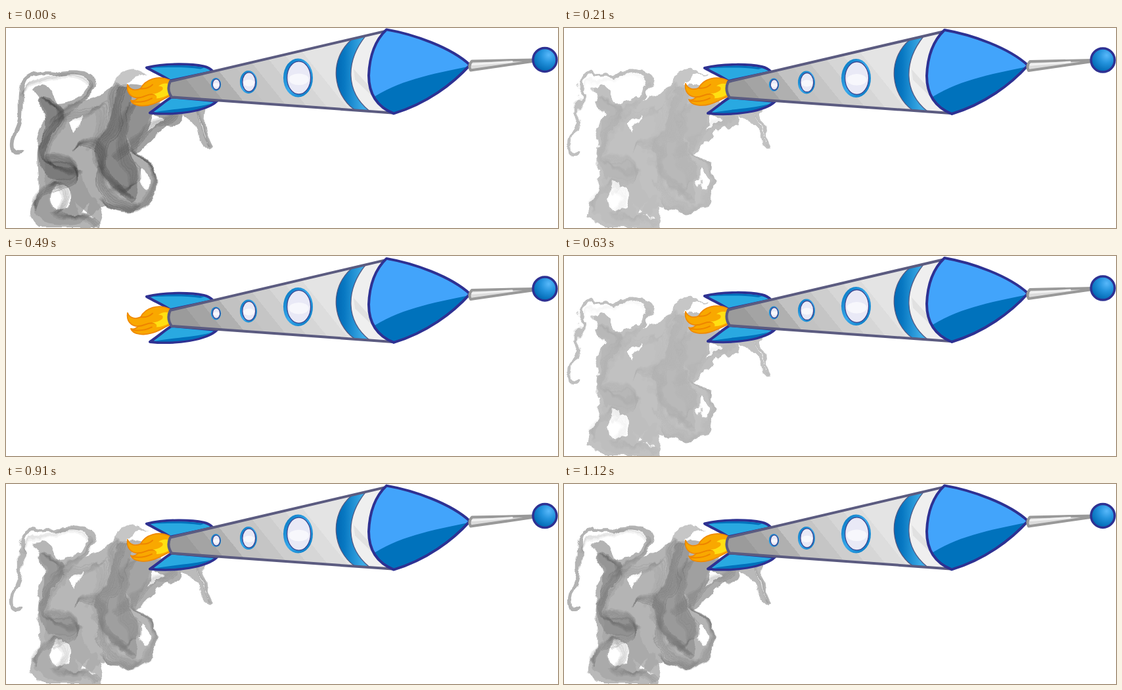
Write an HTML page that moves like this. It is 840 px wide and 305 px high and loops after 1190 ms.

```html
<!DOCTYPE html>
<html lang="en">
<head>
<meta charset="utf-8">
<title>Rocket</title>
<style>
html, body { margin: 0; width: 100%; height: 100%; overflow: hidden; background: #fff; }
svg { display: block; width: 840px; height: 305px; }
</style>
</head>
<body>
<svg viewBox="0 0 840 305" xmlns="http://www.w3.org/2000/svg">
  <defs>
    <linearGradient id="metal" gradientUnits="userSpaceOnUse" x1="270" y1="110" x2="434" y2="-22"></linearGradient>
    <linearGradient id="band" x1="0" y1="0" x2="1" y2="0">
      <stop offset="0" stop-color="#0069b4"/><stop offset="0.25" stop-color="#0878c2"/><stop offset="0.8" stop-color="#3cabe6"/>
    </linearGradient>
    <linearGradient id="ring" x1="0" y1="0" x2="1" y2="1">
      <stop offset="0" stop-color="#0071bc"/><stop offset="0.5" stop-color="#36a9ec"/><stop offset="1" stop-color="#0071bc"/>
    </linearGradient>
    <radialGradient id="ball" cx="0.66" cy="0.3" r="0.72">
      <stop offset="0" stop-color="#58b8fa"/><stop offset="0.45" stop-color="#2493dd"/><stop offset="1" stop-color="#0068b2"/>
    </radialGradient>
    <filter id="ragged" filterUnits="userSpaceOnUse" x="0" y="0" width="340" height="305" color-interpolation-filters="sRGB">
      <feTurbulence type="fractalNoise" baseFrequency="0.045 0.035" numOctaves="3" seed="8"/>
      <feDisplacementMap id="warp" in="SourceGraphic" scale="10" xChannelSelector="R" yChannelSelector="G"/>
    </filter>
    <clipPath id="noseClip"><use href="#noseShape"/></clipPath>
    <path id="noseShape" d="M579 2 C620 9 677 29 706 56 C680 85 640 115 590 130 C563 119 552 99 552 72 C553 45 560 20 579 2Z"/>
  </defs>

  <g id="smoke" filter="url(#ragged)">
    <g id="haze" fill="#c6c6c6" fill-rule="evenodd"></g>
    <g id="folds" fill="#4e4e4e" stroke="#444" fill-rule="evenodd"></g>
  </g>

  <g id="rocket" stroke-linejoin="round" stroke-linecap="round">
    <g stroke="#2e3192" stroke-width="4">
      <path fill="#29a9e1" d="M214 60 C245 53 282 54 301 58 Q310 60 315 66 L250 80 C238 72 228 68 214 60Z"/>
      <path fill="#29a9e1" d="M219 129 C231 121 242 111 252 105 L321 111 C306 126 258 133 219 129Z"/>
    </g>
    <path fill="#0071bc" d="M220 60 C250 55 280 56 302 60 L296 62 C270 58 242 60 220 60Z M226 128 C258 122 287 122 311 115 C293 127 256 130 226 128Z"/>

    <g id="flame">
      <path fill="#f9a800" stroke="#f08a00" stroke-width="1.8" d="M249 79 C232 71 212 78 205 92 C197 96 188 94 185 86 C183 98 190 106 201 106 Q196 112 190 110 C193 119 210 120 222 116 C233 113 240 107 250 103Z"/>
      <path fill="none" stroke="#ee8500" stroke-width="2" d="M205 92 Q216 93 223 86 M201 106 C211 106 215 99 226 101 M193 112 Q209 114 222 107"/>
      <path fill="#ffdf12" d="M249 85 Q240 82 232 88 Q241 88 238 94 Q231 100 222 100 Q231 101 229 107 Q240 106 249 100Z"/>
    </g>

    <path fill="url(#metal)" d="M250 81 L579 4 L588 129 L252 105 Q244 93 250 81Z"/>
    <path fill="#efefef" d="M547 12 L579 4 L588 129 L553 126 C516 96 517 50 547 12Z"/>
    <path fill="#e1e1e1" d="M529 62 L555 91 L562 108 L531 78Z"/>
    <path fill="url(#band)" stroke="#4f5a86" stroke-width="1.3" d="M526 17 L547 12 C517 50 516 96 553 126 L530 124 C498 101 490 48 526 17Z"/>
    <path fill="none" stroke="#5b5b80" stroke-width="4" d="M579 4 L250 81 Q244 93 252 105 L588 129"/>

    <g id="windows"></g>

    <g clip-path="url(#noseClip)">
      <use href="#noseShape" fill="#42a4fb"/>
      <path fill="#0072bc" d="M555 108 C595 80 650 69 710 57 L700 135 L580 140Z"/>
    </g>
    <use href="#noseShape" fill="none" stroke="#2e3192" stroke-width="4"/>

    <path fill="#dcdcdc" stroke="#999" stroke-width="4" d="M804 48 L709 50 Q703 57 707 64 L804 50"/>
    <path fill="none" stroke="#f2f2f2" stroke-width="3" d="M710 55 L770 51"/>
    <circle cx="820" cy="48" r="18" fill="url(#ball)" stroke="#2e3192" stroke-width="3.5"/>
  </g>
</svg>
<script>
const STEP = 70;
const haze = [1, 1, 1, 1, .4, 0, 0, 0, 0, 1, 1, 1, 1, 1, 1, 1, 1];
const folds = [1, .75, .48, .2, .1, 0, 0, 0, 0, .2, .5, .82, .72, .62, .55, .6, .7];
const drop = [.4, .5, .7, 1, 1.6, 2.3, 2.5, 1.9, 1.9, 1, .9, .8, .7, .6, .5, .4, .4];
const flicker = [0, .7, 1.4, 2, 1.2, 0, -.5, 1, 1, 2, 2.2, 2.4, 2, 1.6, 1.2, .8, .4];

const byId = id => document.getElementById(id);
function add(parent, tag, attributes) {
  const node = document.createElementNS('http://www.w3.org/2000/svg', tag);
  for (const key in attributes) node.setAttribute(key, attributes[key]);
  return parent.appendChild(node);
}

// Hard-edged diagonal shading of the hull
const greys = [155, 164, 176, 194, 197, 206, 214, 221, 228];
greys.forEach((grey, i) => {
  for (const edge of [i, i + 1]) {
    add(byId('metal'), 'stop', { offset: edge / greys.length, 'stop-color': `rgb(${grey},${grey},${grey})` });
  }
});

function porthole(cx, cy, rx, ry, rim) {
  const group = byId('windows');
  add(group, 'ellipse', { cx, cy, rx, ry, fill: 'url(#ring)' });
  const pane = { cx: cx + rim / 4, cy, rx: rx - rim, ry: ry - rim };
  add(group, 'ellipse', { ...pane, fill: '#e9e9f6', stroke: '#3c4792', 'stroke-width': 1.3 });
  add(group, 'ellipse', { ...pane, rx: pane.rx * .85, ry: pane.ry * .35, cy: cy + ry * .08, fill: '#f7f7fc' });
}
porthole(319.5, 85.5, 7.7, 10, 2);
porthole(369, 82, 13, 17.5, 3);
porthole(444.5, 75.5, 22.5, 29.5, 4.5);

// Each cloud is a flat haze with a darker layer that fades on its own
function cloud(d, opacity) {
  add(byId('haze'), 'path', { d });
  add(byId('folds'), 'path', { d, 'fill-opacity': opacity, stroke: 'none' });
}
// A veil of thin strands fanning out from one curve
function veil(d, count, dx, dy, opacity = .3) {
  for (let i = 0; i < count; i++) {
    const k = i / count;
    add(byId('folds'), 'path', {
      d, fill: 'none', 'stroke-width': 1.5 + 5 * k, 'stroke-opacity': opacity * (1 - k * .6),
      transform: `translate(${dx * k} ${dy * k})`
    });
  }
}

cloud('M160 101 C163 67 193 54 214 71 C194 74 180 86 169 108Z', 0);
cloud('M78 132 C100 105 130 115 150 98 C165 82 205 80 240 100 C225 130 205 150 200 190 C225 205 233 225 228 250 C215 284 175 285 150 270 C130 285 120 301 90 300 C50 300 37 285 45 262 C55 240 40 200 50 175 C70 160 85 150 78 132Z M80 240 C62 250 65 276 84 276 C101 275 104 250 90 240Z M205 215 C200 230 207 244 214 248 C222 235 218 220 205 215Z M96 143 L116 132 L112 150 L101 160Z M128 266 L117 282 L125 284Z', .2);
cloud('M40 94 C54 76 70 90 78 116 C100 116 118 101 128 88 C130 74 108 70 86 74 C60 64 32 72 26 92 C22 115 29 138 17 162 C10 178 10 186 24 184 C36 186 26 191 16 191 C3 188 5 174 15 150 C23 132 15 110 21 88 C30 63 62 61 86 67 C113 62 137 69 137 86 C132 108 105 119 88 138 C74 150 65 175 50 187 C40 170 54 148 62 138 C60 118 50 105 40 94Z', .22);
cloud('M48 107 C64 100 78 114 87 126 C94 142 78 150 70 166 C58 184 55 192 62 205 C80 197 102 206 108 220 C98 236 72 240 62 224 C46 206 43 186 55 166 C68 146 58 130 48 107Z', .45);
cloud('M170 90 C187 84 197 96 190 117 C179 145 184 172 190 195 C205 230 206 258 190 265 C165 250 140 220 134 190 C141 165 158 150 162 128Z', .4);
cloud('M61 190 C94 196 115 220 124 244 C132 264 152 272 145 290 L140 304 L50 304 C30 288 34 270 54 255 C70 240 48 216 61 190Z M79 237 C60 250 63 278 83 278 C102 277 105 250 91 239Z M105 265 L112 287 L133 289Z', .15);
cloud('M188 112 L269 115 C276 139 264 152 246 148 C229 160 215 185 196 192 C180 170 180 140 188 112Z M224 132 L214 160 L241 139Z', .3);
cloud('M262 117 C282 120 300 108 306 120 C298 140 306 164 315 181 C309 190 297 183 292 168 C290 142 279 148 262 117Z M293 127 L300 160 L307 178 Q296 162 293 127Z', .15);

veil('M24 98 C34 74 104 56 132 84 C137 104 92 117 68 141', 3, -3, 7, .16);
veil('M53 105 C104 132 60 147 53 174 C39 206 84 214 104 213', 6, 15, 10);
veil('M63 207 C91 194 113 221 108 236 C94 252 53 240 45 278', 6, -3, -14);
veil('M83 137 C112 111 127 134 148 112 C164 101 158 150 142 172', 5, -22, 19, .16);
veil('M185 90 C160 120 196 137 162 169 C135 203 163 234 195 260', 7, -20, -7);
veil('M99 188 C120 167 150 185 137 223 C133 259 160 274 193 279', 6, 13, -12);
veil('M192 189 C235 212 237 238 220 263 C202 289 168 280 148 268', 5, -7, -9, .24);
veil('M203 111 C181 144 174 183 202 215 C211 242 190 248 171 239', 6, -18, 9, .24);
veil('M267 118 C260 161 233 137 214 166 C203 184 188 182 170 205', 6, -11, -10, .24);
veil('M74 238 C110 231 98 272 82 279 C105 296 123 273 143 299', 5, -13, 4, .22);
veil('M285 120 C299 128 290 159 308 181', 4, 6, 1, .13);

function render(time) {
  const i = Math.floor(time / STEP) % drop.length;
  byId('smoke').setAttribute('opacity', haze[i]);
  byId('folds').setAttribute('opacity', folds[i]);
  byId('warp').setAttribute('scale', 9 + 22 * (1 - folds[i]));
  byId('rocket').setAttribute('transform', `translate(0 ${drop[i]})`);
  byId('flame').setAttribute('transform', `translate(248 92) skewY(${flicker[i]}) translate(-248 -92)`);
}

const start = performance.now();
function tick() {
  render(performance.now() - start);
  requestAnimationFrame(tick);
}
tick();
</script>
</body>
</html>
```
